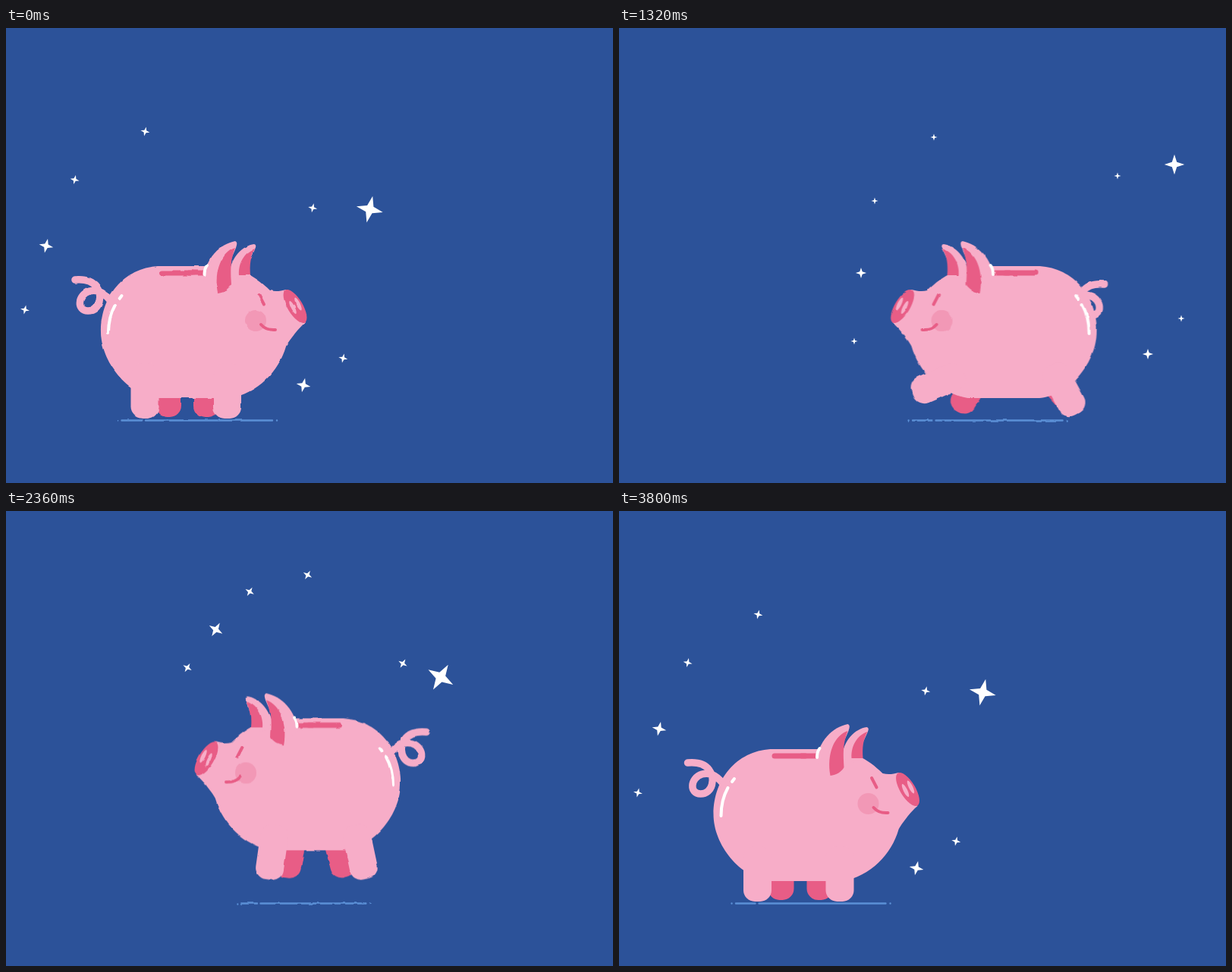
Recreate the animation shown at these times as an HTML page. Size 800 by 600 pixels, loop 3840 ms.

```html
<!DOCTYPE html>
<html lang="en">
<head>
<meta charset="utf-8">
<title>Piggy bank</title>
<style>
  html, body { margin: 0; width: 100%; height: 100%; overflow: hidden; background: #2c5299; }
  svg { display: block; width: 800px; height: 600px; }
  .skin { fill: #f7adc8; }
  .dark { fill: #e85d86; }
  .pen { fill: none; stroke: #e85d86; stroke-width: 4; stroke-linecap: round; }
  .shine { fill: none; stroke: #fff; stroke-width: 4; stroke-linecap: round; }
</style>
</head>
<body>
<svg viewBox="0 0 800 600">
  <defs>
    <filter id="rough" filterUnits="userSpaceOnUse" x="0" y="0" width="800" height="600" color-interpolation-filters="sRGB">
      <feTurbulence id="noise" type="fractalNoise" baseFrequency=".07" numOctaves="2" result="n"/>
      <feDisplacementMap id="shift" in="SourceGraphic" in2="n" scale="3" xChannelSelector="R" yChannelSelector="G"/>
    </filter>
  </defs>
  <rect width="800" height="600" fill="#2c5299"/>
  <g id="stars" fill="#fff"></g>
  <g filter="url(#rough)">
    <path id="ground" d="M-104 517.500h.1M-98.500 517.500H-73M-68 517.500H99M105 517.500h.1" fill="none" stroke="#5b90d6" stroke-width="2.400" stroke-linecap="round"/>
    <g id="coin">
      <g id="face">
        <circle r="28" fill="#eeb02e"/>
        <circle r="22" fill="#fdcb2f"/>
        <path d="M-5 14V-12H4A7 7 0 0 1 4 2H-11M-11 8H6" fill="none" stroke="#c08724" stroke-width="5"/>
      </g>
      <g id="glints" fill="#fff"></g>
    </g>
    <g id="pig">
      <g id="farLegs" class="dark"></g>
      <path id="tail" d="M141 364C131 350 122 344 110 347C94 352 93 373 108 373C124 373 128 352 119 341C113 333 102 331 91 332" fill="none" stroke="#f7adc8" stroke-width="9.500" stroke-linecap="round"/>
      <path class="skin" d="M204 314H270C305 314 328 326 348 346C355 348 362 347 369 345L394 389C385 396 372 414 369 420C360 452 332 482 295 488H200C160 484 125 440 125 400C125 350 160 314 204 314Z"/>
      <g id="nearLegs" class="skin"></g>
      <path class="pen" style="stroke-width:7" d="M205.500 323H246"/>
      <path class="dark" d="M240 319.500H262V326.500H240Z"/>
      <path class="skin" d="M294 326C296 302 312 287 327 285Q331 286 328 292L310 332Z"/>
      <path class="dark" d="M328 291C314 296 306 310 307 326H322C321 312 322 302 328 291Z"/>
      <path class="skin" d="M260 332C263 303 282 285 302 281Q306 282 303 290L279 346Z"/>
      <path class="dark" d="M302 290C284 296 274 320 279 349C287 348 294 344 297 338C296 322 295 307 302 290Z"/>
      <path class="shine" d="M261.500 325Q261.500 317 265 313"/>
      <path class="shine" d="M135 402C135 386 139 374 144 365M149.500 357L152.500 353"/>
      <circle cx="329" cy="386" r="14" fill="#f298b6"/>
      <path class="pen" d="M336 391Q343 399 355 398"/>
      <path id="eye" class="pen"/>
      <ellipse class="dark" rx="10" ry="25" transform="translate(381 367) rotate(-31)"/>
      <ellipse class="skin" rx="2.600" ry="9.500" transform="translate(378 368.500) rotate(-26)"/>
      <ellipse class="skin" rx="2.600" ry="9.500" transform="translate(385 364) rotate(-26)"/>
    </g>
  </g>
</svg>
<script>
const LOOP = 3840, END = 3800, FRAME = 40;
const $ = id => document.getElementById(id);
const put = (el, name, value) => el.setAttribute(name, value);
const clamp = v => Math.max(0, Math.min(1, v));

function make(tag, parent, attrs) {
  const el = document.createElementNS($('pig').namespaceURI, tag);
  for (const name in attrs) put(el, name, attrs[name]);
  return parent.appendChild(el);
}

// Piecewise linear value from [time, value] pairs
function track(keys, t) {
  if (t <= keys[0][0]) return keys[0][1];
  for (let i = 1; i < keys.length; i++) {
    const [t0, a] = keys[i - 1], [t1, b] = keys[i];
    if (t <= t1) return a + (b - a) * (t - t0) / (t1 - t0);
  }
  return keys[keys.length - 1][1];
}

const ease = u => u / 2 + (1 - Math.cos(Math.PI * u)) / 4;

// Four-pointed star of radius 1
const STAR = 'M' + Array.from({ length: 8 }, (_, i) => {
  const r = i % 2 ? 0.34 : 1, a = i * Math.PI / 4;
  return (r * Math.sin(a)).toFixed(3) + ' ' + (-r * Math.cos(a)).toFixed(3);
}).join('L') + 'Z';

const trips = [
  { from: 248, to: 559, start: 40, end: 682 },
  { from: 559, to: 397, start: 1176, end: 1576 },
  { from: 397, to: 247.5, start: 2680, end: 3080 }
];

const longFall = [[-620, -32], [-300, 126], [-260, 143], [-210, 174], [0, 351]];
const shortFall = [[-480, -32], [-330, 52], [0, 256]];
const drops = [
  { at: 820, x: 542, fall: longFall, cx: 541, cy: 310, size: 0.918 },
  { at: 2130, x: 415, fall: shortFall, cx: 413, cy: 228, size: 1.043 },
  { at: 3410, x: 266, fall: longFall, cx: 268.4, cy: 322.5, size: 1 }
];

const stars = [
  [-126, -166, 6.3], [-204, -82, 6.3], [-222, 13, 9.8], [-231, 103, 6.3],
  [116, -115, 6.3], [191, -130, 18.3], [200, 73, 6.3], [156, 120, 9.8]
].map(([x, y, r]) => ({ x, y, r, el: make('path', $('stars'), { d: STAR }) }));

const glints = [[-20, -18], [-26, 0], [-10, -10]]
  .map(([x, y]) => ({ x, y, el: make('path', $('glints'), { d: STAR }) }));

// reach: how far the hip slides when the leg swings out
const leg = (parent, x, w, bottom, reach) => ({
  x, reach, el: make('rect', parent, { x: x - w / 2, y: 442, width: w, height: bottom - 442, rx: 15 })
});
const legs = [
  leg($('nearLegs'), 291.5, 37, 515, 32), leg($('nearLegs'), 183, 37, 515, 32),
  leg($('farLegs'), 265, 34, 513, 60), leg($('farLegs'), 214, 34, 513, 60)
];
const stride = [-67, 28, -32, 42];
const leap = [[-75, 75, -45, 48], [-8, 12, -10, 15]];

const tailKeys = [[0, 0], [520, -5], [820, 0], [1176, 12], [1320, 24], [1600, 0],
  [2500, 0], [2900, 20], [3200, 9], [3500, 0]];
const groundKeys = [[0, 4], [1100, 4], [1320, -21], [1576, -8], [2360, -5], [3080, 5]];
const turnKeys = [[920, 1], [1080, -1], [3520, -1], [3680, 1]];
const leapKeys = [[1660, 0], [1780, 1], [2080, 1], [2340, 0]];
const dangleKeys = [[2080, 0], [2340, 1], [2380, 1], [2470, 0]];

function drawStars(t) {
  const ages = drops.map(d => (t - d.at + END) % END);
  const i = ages.findIndex(a => a < 700);
  put($('stars'), 'visibility', i < 0 ? 'hidden' : 'visible');
  if (i < 0) return;
  const age = ages[i], { cx, cy, size } = drops[i];
  const turn = 57.5 - 0.115 * age;
  const spread = size * 1.105 * Math.sin(Math.PI / 2 * Math.min(1, age / 560));
  const grow = size * clamp(age / 150) * (1 - Math.max(0, (age - 330) / 370) ** 2);
  put($('stars'), 'transform', `translate(${cx} ${cy}) rotate(${turn})`);
  for (const s of stars)
    put(s.el, 'transform', `translate(${s.x * spread} ${s.y * spread}) scale(${s.r * grow})`);
}

function drawCoin(t) {
  const drop = drops.find(d => t < d.at && t - d.at > d.fall[0][0]);
  put($('coin'), 'visibility', drop ? 'visible' : 'hidden');
  if (!drop) return;
  const left = drop.at - t, swing = Math.sin((285 - left) / 40);
  put($('coin'), 'transform', `translate(${drop.x} ${track(drop.fall, -left)})`);
  put($('face'), 'transform', `rotate(${6 * swing})`);
  const sizes = [9.5 + 4 * swing, 4.8 - 1.5 * swing, 4.5];
  glints.forEach((g, i) => put(g.el, 'transform', `translate(${g.x} ${g.y}) rotate(8) scale(${sizes[i]})`));
}

function drawPig(t) {
  let x = trips[0].from, pace = 0;
  for (const { from, to, start, end } of trips) {
    if (t < start) break;
    const u = clamp((t - start) / (end - start));
    x = from + (to - from) * ease(u);
    pace = clamp(2.8 * Math.min(u, 1 - u));
  }
  const step = Math.cos(2 * Math.PI * (t - 520) / 267);
  const lift = Math.max(0, 97 * (1 - ((t - 2055) / 400) ** 2));
  const bounce = pace * 2 * (1 - step);
  put($('pig'), 'transform',
    `translate(${x} ${-lift - bounce}) scale(${track(turnKeys, t)} 1) translate(-248 0)`);

  const split = track(leapKeys, t), dangle = track(dangleKeys, t);
  legs.forEach((l, i) => {
    const a = pace * step * stride[i] + split * leap[0][i] + dangle * leap[1][i];
    const s = Math.sin(a * Math.PI / 180);
    put(l.el, 'transform',
      `translate(${-l.reach * s * Math.abs(s)} ${12 * dangle}) rotate(${a} ${l.x} 462)`);
  });

  const tuck = track(tailKeys, t);
  put($('tail'), 'transform', `translate(${tuck} ${tuck / 4})`);
  put($('eye'), 'd', t > 1665 && t < 2130 ? 'M330 364C330 350 343 349 345 361' : 'M333.500 352L340 364.500');
  put($('ground'), 'transform', `translate(${x + track(groundKeys, t)} 0) scale(${1 - 0.0041 * lift} 1)`);
}

function draw(now) {
  const t = Math.min(END, Math.floor(now % LOOP / FRAME) * FRAME);
  drawStars(t);
  drawCoin(t);
  drawPig(t);
  put($('noise'), 'seed', 1 + Math.floor(t / 80) % 12);
  put($('shift'), 'scale', t < END ? 3 : 0);
}

const origin = performance.now();
function tick() {
  draw(performance.now() - origin);
  requestAnimationFrame(tick);
}
tick();
</script>
</body>
</html>
```
